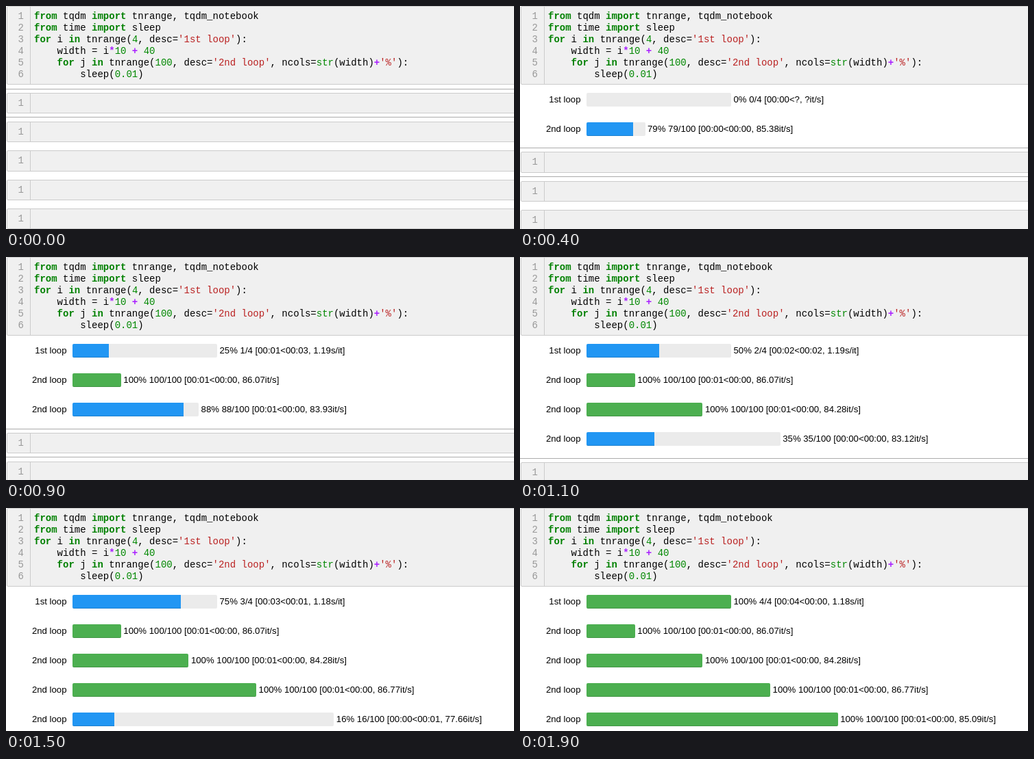
An HTML page for the animation above (2000 ms loop, 741 by 326 pixels).

```html
<!DOCTYPE html>
<html lang="en">
<head>
<meta charset="utf-8">
<title>Nested progress bars</title>
<style>
  html, body { margin: 0; width: 100%; height: 100%; overflow: hidden; background: #fff; }
  #stage { position: relative; width: 741px; height: 326px; overflow: hidden; color: #000; }
  .cell, .rule, .row { position: absolute; }
  .cell {
    left: 1px; width: 760px; box-sizing: border-box; padding: 6px 0 5px;
    border: 1px solid #cbcbcb; border-radius: 2px; background: #f0f0f0;
    font: 14px/17px "Liberation Mono", monospace;
  }
  .gutter {
    position: absolute; left: 0; top: 0; bottom: 0; width: 33px; padding-top: 6px;
    box-sizing: border-box; width: 34px; border-right: 1px solid #cbcbcb; color: #999;
  }
  .gutter span { display: block; width: 24px; text-align: right; }
  .code { margin-left: 39px; min-height: 17.2px; white-space: pre; }
  .code b { color: #008000; }
  .code i { color: #ba2121; font-style: normal; }
  .code u { color: #008800; text-decoration: none; }
  .code s { color: #aa22ff; text-decoration: none; font-weight: bold; }
  .rule { left: 0; width: 100%; height: 1px; background: #ababab; }
  .row { left: 0; display: flex; height: 20px; font: 13.2px/20px "Liberation Sans", Arial, sans-serif; white-space: pre; }
  .label { width: 88.5px; margin-right: 8.5px; text-align: right; flex: none; }
  .bar { flex: 1; background: #ebebeb; border-radius: 2px; overflow: hidden; }
  .fill { height: 100%; background: #2196f3; box-shadow: inset 0 -1px 0 rgba(0, 0, 0, .15); }
  .done { background: #4caf50; }
  .info { margin-left: 3.5px; flex: none; }
</style>
</head>
<body>
<div id="stage">
  <div class="cell" style="top:0">
    <div class="gutter"><span>1</span><span>2</span><span>3</span><span>4</span><span>5</span><span>6</span></div>
    <div class="code"><b>from</b> tqdm <b>import</b> tnrange, tqdm_notebook
<b>from</b> time <b>import</b> sleep
<b>for</b> i <b>in</b> tnrange(<u>4</u>, desc=<i>'1st loop'</i>):
    width = i<s>*</s><u>10</u> <s>+</s> <u>40</u>
    <b>for</b> j <b>in</b> tnrange(<u>100</u>, desc=<i>'2nd loop'</i>, ncols=<u>str</u>(width)<s>+</s><i>'%'</i>):
        sleep(<u>0.01</u>)</div>
  </div>
  <div id="output"></div>
</div>
<script>
const STEP_MS = 100, LOOP_MS = 2000;

// Each step: running inner loop, its count, its rate; the first step has no output yet.
const steps = [
  null, [0, 16, 77.62], [0, 44, 83.94], [0, 61, 84.71], [0, 79, 85.38],
  [1, 7, 69.46], [1, 25, 80.35], [1, 44, 82.61], [1, 70, 83.52], [1, 88, 83.93],
  [2, 7, 70.12], [2, 35, 83.12], [2, 53, 84.65], [2, 79, 85.92],
  [3, 0, 0], [3, 16, 77.66], [3, 44, 83.25], [3, 61, 84.12], [3, 88, 84.87],
  [4, 0, 0],
];
const finalRates = [86.07, 84.28, 86.77, 85.09];
const outerTiming = [
  "00:00<?, ?it/s", "00:01<00:03, 1.19s/it", "00:02<00:02, 1.19s/it",
  "00:03<00:01, 1.18s/it", "00:04<00:00, 1.18s/it",
];

const clock = seconds => "00:" + String(Math.floor(seconds)).padStart(2, "0");

function innerTiming(count, rate) {
  if (!count) return "00:00<?, ?it/s";
  return `${clock(count / rate)}<${clock((100 - count) / rate)}, ${rate.toFixed(2)}it/s`;
}

function row(index, label, count, total, timing, right) {
  const percent = 100 * count / total;
  const text = `${percent}% ${count}/${total} [${timing}]`.replace("<", "&lt;");
  const rowWidth = right ? `width:${right}px` : "";
  const barWidth = right ? "" : "flex:none;width:211px";
  return `<div class="row" style="top:${127 + 43 * index}px;${rowWidth}">` +
    `<div class="label">${label}</div>` +
    `<div class="bar" style="${barWidth}"><div class="fill ${percent === 100 ? "done" : ""}" style="width:${percent}%"></div></div>` +
    `<div class="info">${text}</div></div>`;
}

const rule = y => `<div class="rule" style="top:${y}px"></div>`;

const emptyCell = y => `<div class="cell" style="top:${y}px">` +
  `<div class="gutter"><span>1</span></div><div class="code"></div></div>`;

function render(step) {
  let html = "", rows = 0;
  if (step) {
    const [loop, count, rate] = step;
    html += row(rows++, "1st loop", loop, 4, outerTiming[loop]);
    for (let i = 0; i <= Math.min(loop, 3); i++) {
      const [n, speed] = i < loop ? [100, finalRates[i]] : [count, rate];
      html += row(rows++, "2nd loop", n, 100, innerTiming(n, speed), 398.3 + 98.6 * i);
    }
  }
  const shift = 43.2 * rows;
  html += rule(121 + shift) + rule(162.4 + shift);
  for (let i = 0; i < 5; i++) html += emptyCell(127 + shift + 42.2 * i);
  document.getElementById("output").innerHTML = html;
}

let shown = -1;
const start = performance.now();
function tick() {
  const index = Math.floor((performance.now() - start) % LOOP_MS / STEP_MS);
  if (index !== shown) render(steps[shown = index]);
  requestAnimationFrame(tick);
}
tick();
</script>
</body>
</html>
```
